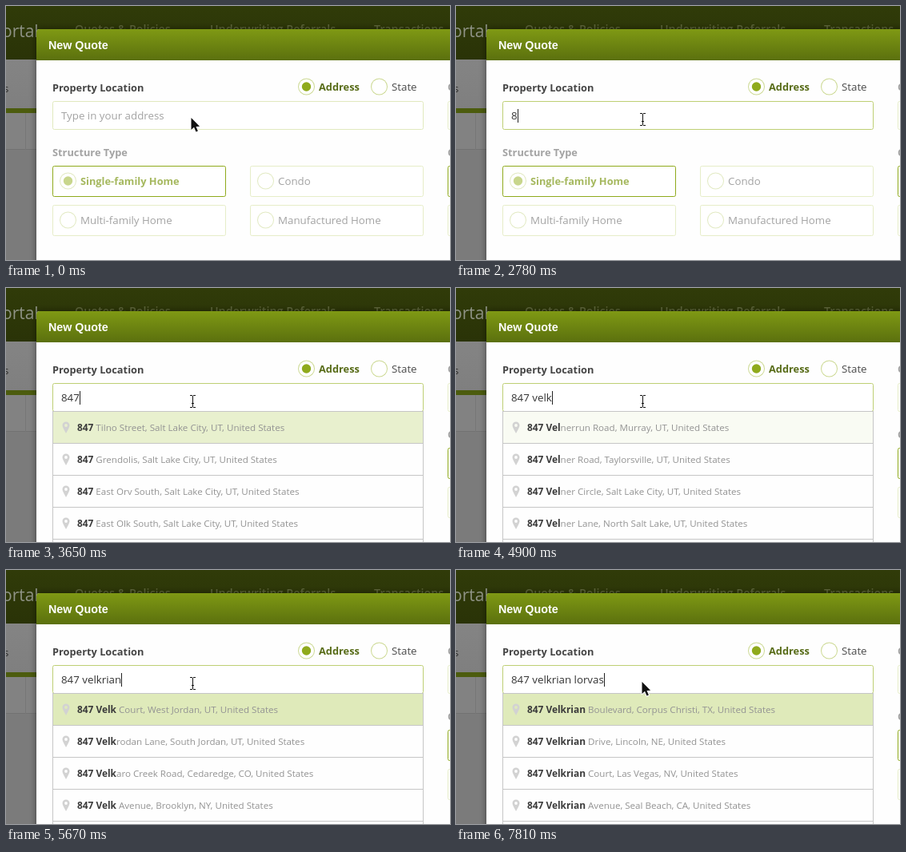
Recreate the animation shown at these times as an HTML page with a canvas. Size 555 px wide and 318 px high, loop 8000 ms.

```html
<!DOCTYPE html>
<html lang="en">
<head>
<meta charset="utf-8">
<title>New Quote</title>
<style>
  html, body { margin: 0; width: 100%; height: 100%; overflow: hidden; }
  canvas { display: block; width: 555px; height: 318px; }
</style>
</head>
<body>
<canvas id="stage" width="555" height="318"></canvas>
<script>
const ctx = document.getElementById('stage').getContext('2d');
const LOOP = 8000;
const SANS = '"Open Sans", "Noto Sans", sans-serif';
const REGULAR = `500 13.3px ${SANS}`;
const STRONG = `bold 12.8px ${SANS}`;
const ITEM = `500 11.6px ${SANS}`;
const ITEM_STRONG = `bold 11.9px ${SANS}`;

const GREEN = '#8faa1c', PALE = '#e6edc8', RING = '#ccd993', MUTED = '#a3a3a3';

const QUERY = '847 velkrian lorvas';
const KEY_TIMES = [2780, 3020, 3200, 3710, 4010, 4310, 4480, 4900, 5140, 5370,
  5490, 5670, 6730, 6970, 7210, 7390, 7570, 7630, 7810];
// Spans in which the blinking caret is hidden.
const CARET_OFF = [[0, 540], [940, 1480], [1950, 2430], [6200, 6620]];

// Each entry is "matched part|rest of the address".
const SLC = 'Salt Lake City, UT';
const LISTS = [
  { at: 3020, rows: [`8|62 Torle Street, ${SLC}`, `8|84 South Torle Street, ${SLC}`,
    `8|6 Orv West, ${SLC}`, `8|62 South Elvor East, ${SLC}`] },
  { at: 3590, flash: true, rows: [`847| Tilno Street, ${SLC}`, `847| Grendolis, ${SLC}`,
    `847| East Orv South, ${SLC}`, `847| East Olk South, ${SLC}`] },
  { at: 4370, rows: [`847 V|ilno Street, ${SLC}`, `847 V|endory Street, ${SLC}`,
    `847 V|orlen East, ${SLC}`, `847 V|antrel Avenue, ${SLC}`] },
  { at: 4900, flash: true, rows: ['847 Vel|nerrun Road, Murray, UT', '847 Vel|ner Road, Taylorsville, UT',
    `847 Vel|ner Circle, ${SLC}`, '847 Vel|ner Lane, North Salt Lake, UT'] },
  { at: 5260, flash: true, rows: ['847 Velk| Court, West Jordan, UT', '847 Velk|rodan Lane, South Jordan, UT',
    '847 Velk|aro Creek Road, Cedaredge, CO', '847 Velk| Avenue, Brooklyn, NY'] },
  { at: 6090, flash: true, rows: ['847 Velkrian| Boulevard, Corpus Christi, TX', '847 Velkrian| Drive, Lincoln, NE',
    '847 Velkrian| Court, Las Vegas, NV', '847 Velkrian| Avenue, Seal Beach, CA'] }
];

const clamp = v => Math.max(0, Math.min(1, v));
const progress = (t, from, to) => clamp((t - from) / (to - from));

function mix(a, b, p) {
  return `rgb(${a.map((v, i) => Math.round(v + (b[i] - v) * p)).join(',')})`;
}

function rect(x, y, w, h, fill) {
  ctx.fillStyle = fill;
  ctx.fillRect(x, y, w, h);
}

function vertical(y0, y1, top, bottom) {
  const g = ctx.createLinearGradient(0, y0, 0, y1);
  g.addColorStop(0, top);
  g.addColorStop(1, bottom);
  return g;
}

function text(str, x, y, font, color) {
  ctx.font = font;
  ctx.fillStyle = color;
  ctx.fillText(str, x, y);
  return ctx.measureText(str).width;
}

function roundBox(x, y, w, h, stroke) {
  ctx.beginPath();
  ctx.roundRect(x + .5, y + .5, w - 1, h - 1, 2);
  ctx.fillStyle = '#fff';
  ctx.fill();
  ctx.strokeStyle = stroke;
  ctx.lineWidth = 1;
  ctx.stroke();
}

function disc(x, y, r, fill) {
  ctx.beginPath();
  ctx.arc(x, y, r, 0, Math.PI * 2);
  ctx.fillStyle = fill;
  ctx.fill();
}

function radio(x, y, ring, dot) {
  disc(x, y, 10.5, ring);
  disc(x, y, 9.5, '#fff');
  if (dot) disc(x, y, 5.7, dot);
}

function drawPage() {
  rect(0, 0, 555, 67, vertical(0, 67, '#303b09', '#2a3307'));
  rect(0, 67, 60, 61, vertical(67, 128, '#848484', '#7f7f7f'));
  rect(0, 128, 60, 6, '#4c5c0e');
  rect(0, 134, 60, 46, '#828282');
  rect(0, 180, 60, 138, '#7b7b7b');
  rect(0, 179, 60, 1, '#727272');
  rect(24, 134, 1, 46, '#777');
  text('ortal', -5, 39, `21px ${SANS}`, '#8f9386');
  text('s', -3, 108, REGULAR, '#2b2b2b');
  const nav = `600 14.3px ${SANS}`;
  text('Quotes & Policies', 86, 34, nav, '#5f673b');
  text('Underwriting Referrals', 255, 34, nav, '#5f673b');
  text('Transactions', 460, 34, nav, '#5f673b');
}

function drawModal() {
  ctx.save();
  ctx.shadowColor = 'rgba(0,0,0,.5)';
  ctx.shadowBlur = 9;
  ctx.beginPath();
  ctx.roundRect(38, 29, 540, 310, 4);
  ctx.fillStyle = '#fefefe';
  ctx.fill();
  ctx.restore();
  ctx.beginPath();
  ctx.roundRect(38, 29, 540, 39, [4, 0, 0, 0]);
  ctx.fillStyle = vertical(29, 68, '#7f9914', '#5b700e');
  ctx.fill();
  text('New Quote', 53, 54, 'bold 14.3px "Liberation Sans", Arial, sans-serif', '#fff');
}

function option(x, y, label, selected) {
  roundBox(x, y, 217, 39, selected ? GREEN : PALE);
  radio(x + 19.5, y + 19, '#e2eac3', selected && '#c8d68c');
  text(label, x + 35, y + 24, selected ? STRONG : REGULAR, selected ? '#a5b85e' : MUTED);
}

function drawForm() {
  text('Property Location', 58, 107, STRONG, '#444');
  radio(375.5, 101, RING, GREEN);
  text('Address', 391, 106, STRONG, '#586c18');
  radio(466.5, 101, RING);
  text('State', 482, 106, REGULAR, '#4a4a4a');

  text('Structure Type', 58, 188, STRONG, MUTED);
  option(58, 200, 'Single-family Home', true);
  option(305, 200, 'Condo', false);
  option(58, 249, 'Multi-family Home', false);
  option(305, 249, 'Manufactured Home', false);

  text('C', 552, 106, STRONG, MUTED);
  text('C', 552, 188, STRONG, MUTED);
  roundBox(552, 119, 40, 36, PALE);
  roundBox(552, 200, 40, 39, GREEN);
  roundBox(552, 249, 40, 39, PALE);
}

function drawInput(t) {
  const focus = progress(t, 480, 710);
  roundBox(58, 119, 464, 36, mix([225, 233, 190], [190, 207, 116], focus));
  const typed = QUERY.slice(0, KEY_TIMES.filter(k => k <= t).length);
  if (!typed) text('Type in your address', 69, 142, REGULAR, MUTED);
  const width = text(typed, 69, 142, REGULAR, '#333');
  const hidden = CARET_OFF.some(([from, to]) => t >= from && t < to);
  if (!hidden) rect(Math.round(69 + width), 129, 1, 17, '#222');
}

function pin(x, y, hole) {
  ctx.beginPath();
  ctx.arc(x, y, 4.5, Math.PI * .87, Math.PI * .13);
  ctx.quadraticCurveTo(x + 3, y + 5, x, y + 10);
  ctx.quadraticCurveTo(x - 3, y + 5, x - 4.2, y + 1.8);
  ctx.fillStyle = '#d2d2d2';
  ctx.fill();
  disc(x, y, 1.9, hole);
}

function drawSuggestions(t) {
  const list = LISTS.filter(l => l.at <= t).pop();
  if (!list) return;
  const glow = list.flash ? clamp(.15 + (t - list.at) / 110) : 1;
  const highlight = mix([254, 254, 254], [223, 234, 186], glow);

  ctx.globalAlpha = progress(t, 3020, 3300);
  rect(58, 154, 464, 164, '#fefefe');
  list.rows.forEach((row, i) => {
    const top = 155 + i * 40;
    const fill = i ? '#fefefe' : highlight;
    const [match, rest] = row.split('|');
    rect(59, top, 462, 39, fill);
    rect(58, top + 39, 464, 1, '#c6c6c6');
    pin(75, top + 17, fill);
    const width = text(match, 89, top + 24, ITEM_STRONG, '#3a3a3a');
    text(`${rest}, United States`, 89 + width, top + 24, ITEM, '#939393');
  });
  rect(58, 154, 464, 1, '#c6c6c6');
  rect(58, 155, 1, 163, '#c6c6c6');
  rect(521, 155, 1, 163, '#c6c6c6');
  ctx.globalAlpha = 1;
}

function drawArrow(x, y) {
  const outline = [[0, 0], [0, 15], [3.5, 11.8], [6, 17.5], [8.4, 16.5], [6, 11], [10.6, 10.8]];
  ctx.beginPath();
  outline.forEach(([dx, dy]) => ctx.lineTo(x + dx, y + dy));
  ctx.closePath();
  ctx.lineJoin = 'round';
  ctx.lineWidth = 2;
  ctx.strokeStyle = '#fff';
  ctx.stroke();
  ctx.fillStyle = '#111';
  ctx.fill();
}

function drawBeam(x, y) {
  rect(x, y + 1, 1, 14, '#111');
  rect(x - 1, y + 10, 3, 1, '#111');
  for (const edge of [y, y + 15]) {
    rect(x - 3, edge, 3, 1, '#111');
    rect(x + 1, edge, 3, 1, '#111');
  }
}

function drawPointer(t) {
  if (t < 540) drawArrow(231.5, 140);
  else if (t < 6680) drawBeam(233, 134);
  else drawArrow(232.5, 140);
}

function frame(now) {
  const t = now % LOOP;
  drawPage();
  drawModal();
  drawForm();
  drawInput(t);
  drawSuggestions(t);
  drawPointer(t);
  requestAnimationFrame(frame);
}
requestAnimationFrame(frame);
</script>
</body>
</html>
```
